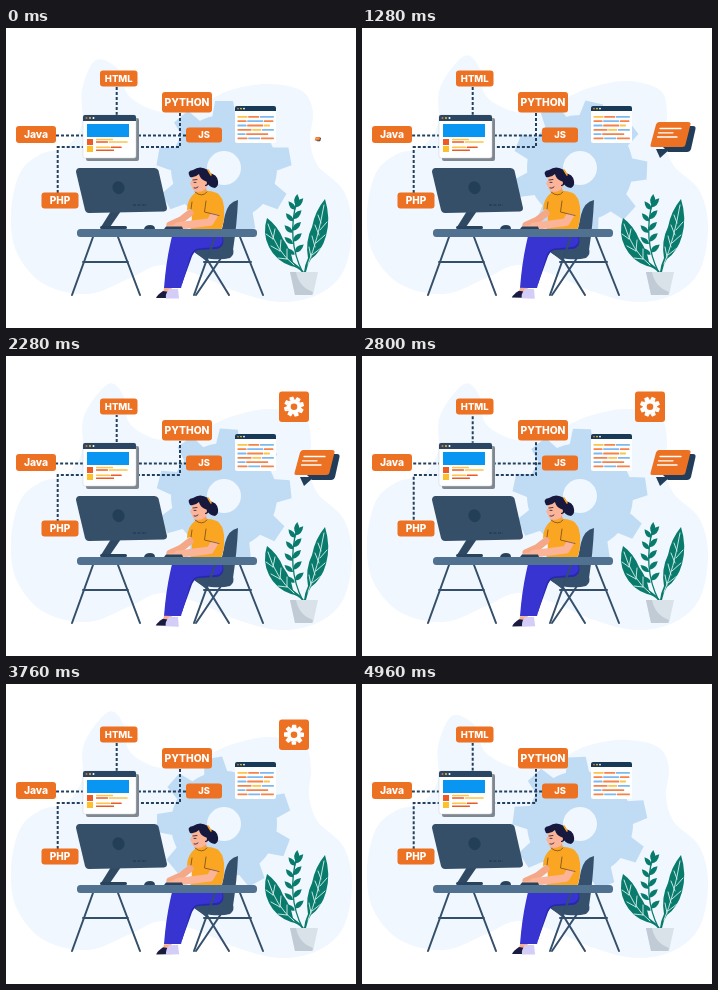
Animation of 350 by 300 pixels, one loop 5000 ms. Source, as an HTML page:

```html
<!DOCTYPE html>
<html lang="en">
<head>
<meta charset="utf-8">
<title>Web developer at work</title>
<style>
html, body { margin: 0; width: 100%; height: 100%; overflow: hidden; background: #fff; }
svg { display: block; width: 100vw; height: 100vh; }
text { font: 800 10px Inter, "Open Sans", sans-serif; fill: #fff; text-anchor: middle; }
.line { fill: none; stroke-linecap: round; stroke-linejoin: round; }
.dash { fill: none; stroke: #24405f; stroke-width: 2; stroke-dasharray: 3 2; }
</style>
</head>
<body>
<svg viewBox="0 0 350 300">
  <path id="blob" fill="#f0f7fe"/>
  <g id="cog" fill="#c0dcf4"></g>
  <circle cx="218" cy="140" r="17" fill="#f0f7fe"/>

  <g id="wires"></g>
  <g id="labels"></g>

  <!-- page window -->
  <rect x="80" y="90" width="53" height="43" rx="2" fill="#7f8790"/>
  <rect x="77" y="87" width="53" height="43" rx="2" fill="#fff" stroke="#c9d0d7" stroke-width=".5"/>
  <path d="M77 93v-4q0-2 2-2h49q2 0 2 2v4z" fill="#2b4662"/>
  <circle cx="80.5" cy="90" r="1" fill="#ec7122"/>
  <circle cx="84" cy="90" r="1" fill="#fbc02d"/>
  <circle cx="87.5" cy="90" r="1" fill="#fff"/>
  <rect x="81" y="96" width="42" height="13" fill="#0995f2"/>
  <rect x="81" y="111" width="6" height="6" fill="#ee5a24"/>
  <rect x="81" y="118" width="6" height="6" fill="#fbc02d"/>
  <g id="page"></g>

  <!-- code window -->
  <rect x="229" y="78" width="41" height="37" rx="2" fill="#fff"/>
  <path d="M229 83v-3q0-2 2-2h37q2 0 2 2v3z" fill="#173a58"/>
  <circle cx="232" cy="80.6" r=".9" fill="#ec7122"/>
  <circle cx="235" cy="80.6" r=".9" fill="#fbc02d"/>
  <circle cx="238" cy="80.6" r=".9" fill="#fff"/>
  <g id="code"></g>

  <!-- chair -->
  <path d="M232 172Q222 174 219 187Q217 199 213 211L209 222H227Q231 196 232 172z" fill="#35506c"/>
  <path d="M186 221H227Q229 226 224 230Q217 232 205 231Q191 229 186 221z" fill="#35506c"/>
  <path class="line" d="M199 228L223 267M215 230L190 267M190 224L203 234" stroke="#35506c" stroke-width="2"/>

  <!-- legs -->
  <path d="M181 209H217Q219 219 211 221L192 222Q187 224 185 231L176 256H168L174 222z" fill="#2927ae"/>
  <path d="M166 208H216Q219 217 210 219L192 220.500Q186 222 184 229L175 260H158Q160 235 164 217z" fill="#3734d2"/>
  <g id="foot">
    <path d="M158 260H166L163 265H157z" fill="#f7ae91"/>
    <path d="M157 263L163 264L160 270H150Q151 267 157 263z" fill="#191b40"/>
    <path d="M163 261H172L173 270.500H160Q159 266 163 261z" fill="#d3cdf7"/>
  </g>

  <!-- body -->
  <path d="M189 159L199 157L202 166L190 168z" fill="#ee9b7e"/>
  <path d="M190 164Q201 161 211 165Q217 169 218 179Q219 192 215 203H184Q187 191 185 181L181 182Q181 171 190 164z" fill="#fba622"/>
  <g id="arms" class="line">
    <path d="M184 185L175 192L164 197" stroke="#f5a888" stroke-width="7"/>
    <path d="M210 184L204 194L188 196L172 198" stroke="#fbb497" stroke-width="7.500"/>
    <path d="M174 198L162 199.500" stroke="#fbb497" stroke-width="4"/>
  </g>
  <path d="M202 168Q213 165 216 175L214 187L199 184z" fill="#fba622"/>
  <path class="line" d="M200 173L198.500 184L213 187.500M185 181L186 174M189 164Q196 170 201 164" stroke="#5d401f" stroke-width=".7"/>

  <!-- head -->
  <path d="M185 147Q187 142 198 143L203 150Q203 161 195 163.500Q187 165 186 159L184 155.500L186 152z" fill="#fbb497"/>
  <path d="M184 149Q180 143 187 142Q194 137 202 142Q206 145 205 152Q203 158 199 158L199 153Q194 151 193 146Q189 150 184 149z" fill="#17183d"/>
  <path d="M203 145Q211 146 212 153Q213 158 209 160Q202 159 201 153z" fill="#17183d"/>
  <path class="line" d="M202 142L205 147" stroke="#fba622" stroke-width="1.500"/>
  <circle cx="199" cy="155" r="2" fill="#fbb497"/>
  <path class="line" d="M187 152L191 151.500M188 154.400H190M188 160Q190 161 192 159" stroke="#17183d" stroke-width=".8"/>

  <!-- desk -->
  <path class="line" d="M87 209L66 267M112 209L134 267M77 234H122M209 209L188 267M234 209L257 267M198 234H245" stroke="#344f69" stroke-width="2"/>
  <path d="M105 183H115L104 199H95z" fill="#2f4963"/>
  <path d="M73 140H148.500Q151.500 140 152.500 142.500L161 180Q161 183 158 183.500L83 185Q80 185 79 182L70 144Q70 140.500 73 140z" fill="#364f69"/>
  <ellipse cx="112.500" cy="159.700" rx="6" ry="6.500" transform="rotate(-25 112.500 159.700)" fill="#233f58"/>
  <path d="M127 177H141" stroke="#233f58" stroke-width="1.500" stroke-dasharray="3 1.500"/>
  <rect x="94" y="198" width="27" height="3" rx="1.500" fill="#2a435d"/>
  <path d="M138 201Q139 197 144 197Q149 197 149 201z" fill="#2a435d"/>
  <path d="M158 201L160 198.500H176L177 201z" fill="#2a435d"/>
  <rect x="71" y="201" width="180" height="8" rx="3.500" fill="#50718f"/>

  <!-- plant -->
  <g fill="#087b6d">
    <path d="M298 244Q299 236 302 230Q299 213 306 199Q309 183 319 171Q325 190 320 208Q316 223 305 231Q301 237 300 244z"/>
    <path d="M296 244Q291 239 285 238Q270 233 263 219Q256 205 261 190Q272 198 277 211Q285 222 287 234Q293 238 298 244z"/>
    <g id="leaves"></g>
  </g>
  <path class="line" d="M302 236Q312 212 318 177M305 229L303 219M309 219L306 208M313 207L309 197M315 195L312 187M306 227L315 220M310 215L319 207M314 202L321 194M288 237Q270 223 262 196M281 231L272 230M274 223L265 218M267 211L260 206M281 231L281 221M274 223L275 212M267 211L269 201" stroke="#d9f0eb" stroke-width=".9"/>
  <path class="line" d="M297 245Q280 212 291 172" stroke="#087b6d" stroke-width="1.300"/>
  <path d="M284 244H312L307 267H289z" fill="#dae2e9"/>
  <path d="M284 244H290Q293 259 307 264L306 267H289z" fill="#c0cbd5"/>

  <!-- message -->
  <g id="chat">
    <path id="tail" d="M294 121H308L298 130z" fill="#213d59"/>
    <path d="M301 98H331Q334 98 333.500 101L329 121Q328 124 325 124H306L300 118z" fill="#213d59"/>
    <path d="M297 94H326Q329 94 328.500 96.500L323.500 116.500Q323 119 320 119H290Q288 119 288.500 117L294 96.500Q295 94 297 94z" fill="#ec7122"/>
    <path class="line" d="M298 100.500H319M296.500 104.800H311M295.500 109H315" stroke="#fff" stroke-width="1.300"/>
  </g>

  <!-- settings tile -->
  <g id="tile">
    <rect x="273" y="35.500" width="30" height="30.500" rx="3" fill="#ec7122"/>
    <g id="gear" fill="#fff"></g>
    <circle cx="288" cy="50.700" r="3.300" fill="#ec7122"/>
  </g>
</svg>
<script>
const LOOP = 5000;
const $ = id => document.getElementById(id);
const clamp = x => Math.max(0, Math.min(1, x));

// closed smooth curve through points
function smooth(p) {
  const n = p.length, at = i => p[(i + n) % n];
  let d = `M${p[0]}`;
  for (let i = 0; i < n; i++) {
    const [a, b, c, e] = [at(i - 1), at(i), at(i + 1), at(i + 2)];
    const c1 = b.map((v, k) => (v + (c[k] - a[k]) / 6).toFixed(2));
    const c2 = c.map((v, k) => (v - (e[k] - b[k]) / 6).toFixed(2));
    d += `C${c1} ${c2} ${c}`;
  }
  return d + 'z';
}

function cog(teeth, outer, inner, top, base) {
  let s = `<circle r="${inner}"/>`;
  for (let i = 0; i < teeth; i++)
    s += `<path transform="rotate(${i * 360 / teeth})" d="M${-base} ${-inner * .94}L${-top} ${-outer}H${top}L${base} ${-inner * .94}z"/>`;
  return s;
}

const labels = [
  ['Java', 10, 98, 40, 17, 10.3], ['HTML', 94, 42.5, 37.5, 16, 9.5],
  ['PYTHON', 156, 64, 50, 20.5, 10.3], ['JS', 180, 99.5, 36, 15, 9.3],
  ['PHP', 35.5, 164.5, 37, 16, 10]
];
$('labels').innerHTML = labels.map(([s, x, y, w, h, size]) =>
  `<rect x="${x}" y="${y}" width="${w}" height="${h}" rx="3" fill="#ec7122"/>` +
  `<text x="${x + w / 2}" y="${y + h / 2 + size * .36}" style="font-size:${size}px">${s}</text>`).join('');

$('wires').innerHTML = ['M50 107.500H77', 'M110.700 59V87', 'M51.700 165V119H77',
  'M174 85V119H132', 'M180 107.500H132']
  .map(d => `<path class="dash" d="${d}"/>`).join('');

const colors = { o: '#f4824a', y: '#fbc44a', b: '#7db9ee', r: '#ee5a24' };
// each row: y, then colour and length pairs
function rows(id, x0, thick, list) {
  $(id).innerHTML = list.map(([y, ...parts]) => {
    let x = x0, s = '';
    for (let i = 0; i < parts.length; i += 2) {
      s += `<rect x="${x}" y="${y}" width="${parts[i + 1]}" height="${thick}" rx=".5" fill="${colors[parts[i]]}"/>`;
      x += parts[i + 1] + .7;
    }
    return s;
  }).join('');
}
rows('page', 90, 1.5, [[110.7, 'y', 17], [113.3, 'r', 12, 'y', 19], [118.5, 'y', 14, 'r', 11], [121.5, 'r', 18]]);
rows('code', 231.5, 1.8, [[88, 'y', 10, 'o', 11, 'b', 14], [92.3, 'o', 9, 'b', 16, 'o', 9.5],
  [96.6, 'b', 9, 'o', 16, 'y', 6], [100.9, 'o', 14, 'y', 9, 'b', 12], [105.2, 'b', 8, 'o', 22],
  [109.5, 'o', 10, 'b', 12, 'o', 13]]);

const leaf = (x, y, turn, len) =>
  `<path transform="translate(${x} ${y}) rotate(${turn})" d="M0 0Q${len * .4} ${-len * .48} ${len} 0Q${len * .4} ${len * .38} 0 0z"/>`;
let foliage = leaf(290.5, 178, -86, 12);
for (let i = 0; i < 5; i++) {
  const u = .93 - i * .15, v = 1 - u;
  const x = 297 * v * v + 560 * u * v + 291 * u * u;
  const y = 245 * v * v + 424 * u * v + 172 * u * u;
  foliage += leaf(x, y + 4, -130 - i * 4, 11) + leaf(x, y + 2, -50 + i * 2, 12);
}
$('leaves').innerHTML = foliage;
$('cog').innerHTML = cog(9, 67, 53, 9, 12);
$('gear').innerHTML = cog(8, 10, 7.2, 2, 2.5);

// x, y and how far each point drifts
const shore = [
  [76, 62, 2, -2], [90, 32, 12, -4], [113, 42, 4, -3], [123, 68, 1, 0], [155, 84, 0, 0],
  [190, 78, 0, -2], [225, 62, 2, -2], [263, 56, 2, -3], [296, 63, 2, -1], [307, 84, -2, 0],
  [304, 112, -1, 0], [312, 138, 0, 0], [337, 162, 0, 0], [346, 198, 0, 0], [338, 242, 0, 0],
  [313, 266, 0, 0], [275, 274, 0, 0], [232, 264, 0, 0], [190, 246, 0, 0], [155, 237, 0, 0],
  [122, 251, 0, 0], [82, 266, 0, 0], [38, 256, 0, 0], [11, 225, 0, 0], [5, 185, 0, 0],
  [14, 145, 0, 0], [35, 126, 0, 0], [60, 119, 0, 0], [76, 96, 0, 0]
];

const K = 1.70158;
const backIn = x => (K + 1) * x ** 3 - K * x * x;
const backOut = x => 1 - backIn(1 - x);
const pop = (t, start, end, inMs, outMs) =>
  t < end ? backOut(clamp((t - start) / inMs)) : 1 - backIn(clamp((t - end) / outMs));

function grow(id, x, y, s) {
  $(id).setAttribute('transform', `translate(${x} ${y}) scale(${Math.max(0, s)}) translate(${-x} ${-y})`);
}

const dashes = document.querySelectorAll('.dash');

function draw(t) {
  const drift = Math.min(1, 1.6 * Math.sin(Math.PI * t / LOOP));
  const wave = Math.sin(2 * Math.PI * t / 1000);
  const turn = 360 * t / LOOP;
  $('blob').setAttribute('d', smooth(shore.map(([x, y, dx, dy]) => [x + dx * drift, y + dy * drift])));
  $('cog').setAttribute('transform', `translate(218 140) rotate(${turn})`);
  $('gear').setAttribute('transform', `translate(288 50.7) rotate(${turn})`);
  for (const d of dashes) d.style.strokeDashoffset = -20 * t / LOOP;
  $('foot').setAttribute('transform', `rotate(${wave * 1.5} 168 262)`);
  $('arms').setAttribute('transform', `translate(0 ${wave * .3})`);
  grow('chat', 312, 111.5, pop(t, -15, 3140, 520, 520));
  $('tail').setAttribute('opacity', clamp((t - 350) / 500));
  grow('tile', 288, 50.7, pop(t, 1290, 4450, 500, 480));
}

function tick() {
  draw(performance.now() % LOOP);
  requestAnimationFrame(tick);
}
tick();
</script>
</body>
</html>
```
